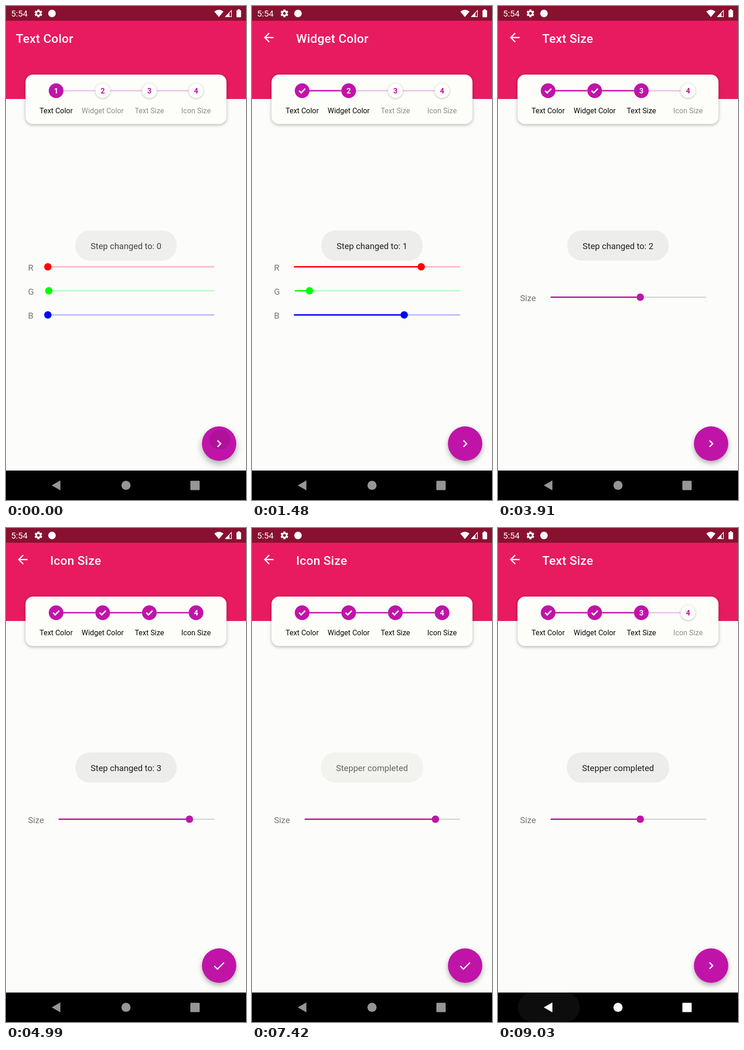
These frames come from a looping animation (522 by 1073 pixels, 9.16 s). An HTML page with a canvas:

```html
<!DOCTYPE html>
<html lang="en">
<head>
<meta charset="utf-8">
<title>Stepper demo</title>
<style>
html, body { margin: 0; width: 100%; height: 100%; overflow: hidden; background: #fcfcfb; }
canvas { display: block; }
</style>
</head>
<body>
<canvas id="stage" width="522" height="1073"></canvas>
<script>
const ctx = document.getElementById('stage').getContext('2d');
const LOOP = 9160, TAU = Math.PI * 2;
const ACCENT = '#c014a8', PAPER = '#fcfcfb';
const STEPS = ['Text Color', 'Widget Color', 'Text Size', 'Icon Size'];
const STEP_X = [109, 210.3, 311.8, 413.3];

// [time, step] of every navigation
const NAV = [[-1000, 0], [110, 1], [2430, 2], [4390, 3], [8830, 2]];
const PRESSES = [-50, 2290, 4240, 7040];
// [text, show, hide]
const TOASTS = [
  ['Step changed to: 0', -2160, -160],
  ['Step changed to: 1', 260, 2266],
  ['Step changed to: 2', 2500, 4490],
  ['Step changed to: 3', 4490, 6500],
  ['Stepper completed', 7250, Infinity]
];
const BACK_TOUCH = 8700;

const clamp = v => Math.max(0, Math.min(1, v));
const mix = (a, b, k) => a + (b - a) * k;

function line(points, color, width, cap = 'butt') {
  ctx.beginPath();
  points.forEach(([x, y]) => ctx.lineTo(x, y));
  ctx.strokeStyle = color;
  ctx.lineWidth = width;
  ctx.lineCap = cap;
  ctx.lineJoin = 'miter';
  ctx.stroke();
}

function poly(points, color) {
  ctx.beginPath();
  points.forEach(([x, y]) => ctx.lineTo(x, y));
  ctx.fillStyle = color;
  ctx.fill();
}

function disc(x, y, r, color) {
  ctx.beginPath();
  ctx.arc(x, y, r, 0, TAU);
  ctx.fillStyle = color;
  ctx.fill();
}

function box(x, y, w, h, r, color) {
  ctx.beginPath();
  ctx.roundRect(x, y, w, h, r);
  ctx.fillStyle = color;
  ctx.fill();
}

function text(str, x, y, size, color, weight = 400, align = 'left', spacing = 0) {
  ctx.font = `${weight} ${size}px Roboto, sans-serif`;
  ctx.textAlign = align;
  ctx.letterSpacing = spacing + 'px';
  ctx.fillStyle = color;
  ctx.fillText(str, x, y);
}

function withShadow(color, blur, dy, draw) {
  ctx.save();
  ctx.shadowColor = color;
  ctx.shadowBlur = blur;
  ctx.shadowOffsetY = dy;
  draw();
  ctx.restore();
}

function gear(x, y) {
  for (let i = 0; i < 6; i++) {
    const a = i * TAU / 6 + TAU / 12;
    line([[x, y], [x + Math.cos(a) * 8.4, y + Math.sin(a) * 8.4]], '#fff', 4.6);
  }
  disc(x, y, 6.4, '#fff');
  disc(x, y, 2.9, '#88112f');
}

function statusBar() {
  ctx.fillStyle = '#88112f';
  ctx.fillRect(0, 0, 522, 32);
  text('5:54', 11, 23, 18.6, '#fff');
  gear(70.5, 16);
  disc(100, 16.2, 8.2, '#fff');
  ctx.beginPath();
  ctx.moveTo(463, 24);
  ctx.lineTo(453, 12);
  ctx.quadraticCurveTo(463, 4.4, 473, 12);
  ctx.closePath();
  ctx.fillStyle = '#fff';
  ctx.fill();
  line([[477.5, 23.2], [490.3, 23.2], [490.3, 9.8], [477.5, 23.2]], '#fff', 1.4);
  poly([[476, 24], [486, 24], [486, 13.5]], '#fff');
  box(501.3, 9, 10, 15.4, 1.5, '#fff');
  ctx.fillRect(504.2, 7, 4.2, 3);
}

function header(step) {
  ctx.fillStyle = '#e81b60';
  ctx.fillRect(0, 32, 522, 170);
  if (step) {
    line([[47, 68.5], [28, 68.5]], '#fff', 2.7);
    line([[37.4, 58.9], [27.8, 68.5], [37.4, 78.1]], '#fff', 2.7);
  }
  text(STEPS[step], step ? 96 : 21.5, 79.5, 26.6, '#fff', 500, 'left', 0.3);
}

function stepper(step) {
  withShadow('rgba(0,0,0,.3)', 7, 2, () => box(42.5, 149, 437, 107.5, 16, '#fdfdfa'));
  for (let i = 0; i < 3; i++) {
    const color = i < step ? ACCENT : '#ecc3e8';
    line([[STEP_X[i] + 16, 184], [STEP_X[i + 1] - 16, 184]], color, 3);
  }
  STEP_X.forEach((x, i) => {
    const reached = i <= step;
    if (reached) disc(x, 184, 16, ACCENT);
    else withShadow('rgba(0,0,0,.28)', 4, 1, () => disc(x, 184, 16, '#fdfdfc'));
    if (i < step) line([[x - 6.6, 184], [x - 2, 188.6], [x + 6.8, 179.6]], '#fff', 3);
    else text(i + 1, x, 190, 16, reached ? '#fff' : ACCENT, 700, 'center');
    text(STEPS[i], x, 233, 15.95, reached ? '#0a0a0a' : '#8e8e8e', 400, 'center');
  });
}

function slider(label, x, y, at, color, rest) {
  text(label, 48, y + 8, 18.6, '#757575');
  line([[x, y], [453, y]], rest, 3);
  line([[x, y], [at, y]], color, 3);
  disc(at, y, 8, color);
}

function page(step, alpha) {
  if (alpha <= 0) return;
  ctx.globalAlpha = alpha;
  if (step < 2) {
    const [r, g, b] = step ? [368, 125, 331] : [91, 93, 91];
    slider('R', 91, 566.5, r, '#ff0000', '#fdb8b8');
    slider('G', 93, 618.6, g, '#00ff00', '#b9fbc2');
    slider('B', 91, 671, b, '#0000ff', '#b9b9fb');
  } else {
    slider('Size', 114.5, 632.5, step === 2 ? 309.5 : 399, ACCENT, '#d9d9d9');
  }
  ctx.globalAlpha = 1;
}

function fab(t, step) {
  const x = 463.5, y = 950.5, r = 37.4;
  const start = PRESSES.filter(p => p <= t).pop();
  const d = t - start;
  const strength = clamp(d / 150) * (1 - clamp((d - 200) / 180));
  const lift = clamp(d / 120) * (1 - clamp((d - 220) / 120));
  withShadow('rgba(0,0,0,.32)', mix(11, 20, lift), mix(5, 9, lift), () => disc(x, y, r, ACCENT));
  if (strength > 0) {
    const k = clamp(d / 190);
    ctx.save();
    ctx.beginPath();
    ctx.arc(x, y, r, 0, TAU);
    ctx.clip();
    disc(mix(465.5, x, k), mix(938.5, y, k), mix(15, 42, k), `rgba(0,0,0,${0.26 * strength})`);
    ctx.restore();
  }
  if (step === 3) line([[453, 951.5], [459.9, 958.2], [474.2, 943.9]], '#fff', 2.7);
  else line([[460, 943.8], [466.9, 950.7], [460, 957.6]], '#fff', 2.8);
}

function toast([str, show, hide], t) {
  const enter = 1 - clamp((t - show) / 400), leave = clamp((t - hide) / 400);
  const alpha = (1 - enter * enter) * (1 - leave * leave);
  if (alpha <= 0) return;
  const w = str.startsWith('Stepper') ? 222.5 : 220;
  ctx.globalAlpha = alpha;
  box(261 - w / 2, 487.5, w, 65.5, 31, '#ededeb');
  text(str, 261, 527.5, 18.6, '#212121', 400, 'center');
  ctx.globalAlpha = 1;
}

function navBar(t) {
  ctx.fillStyle = '#000';
  ctx.fillRect(0, 1009, 522, 64);
  const k = clamp((t - BACK_TOUCH) / 150), v = Math.round(mix(150, 255, k));
  if (k > 0) {
    const a = 0.15 * k * (1 - 0.67 * clamp((t - BACK_TOUCH - 150) / 180));
    box(43, 1009, 135, 64, 32, `rgba(255,255,255,${a})`);
  }
  const color = `rgb(${v},${v},${v})`;
  poly([[99.5, 1041.3], [118.3, 1030.6], [118.3, 1052]], color);
  disc(261, 1041.2, 9.9, color);
  box(401, 1031.2, 20.2, 20.2, 1.5, color);
}

function draw(t) {
  const index = NAV.findLastIndex(n => n[0] <= t);
  const [since, step] = NAV[index];
  ctx.fillStyle = PAPER;
  ctx.fillRect(0, 0, 522, 1073);
  statusBar();
  header(step);
  stepper(step);
  const k = clamp((t - since - 45) / 150);
  if (index) page(NAV[index - 1][1], 1 - k);
  page(step, index ? k : 1);
  fab(t, step);
  TOASTS.forEach(item => toast(item, t));
  navBar(t);
}

const begin = performance.now();
function tick() {
  draw((performance.now() - begin) % LOOP);
  requestAnimationFrame(tick);
}
draw(0);
requestAnimationFrame(tick);
</script>
</body>
</html>
```
